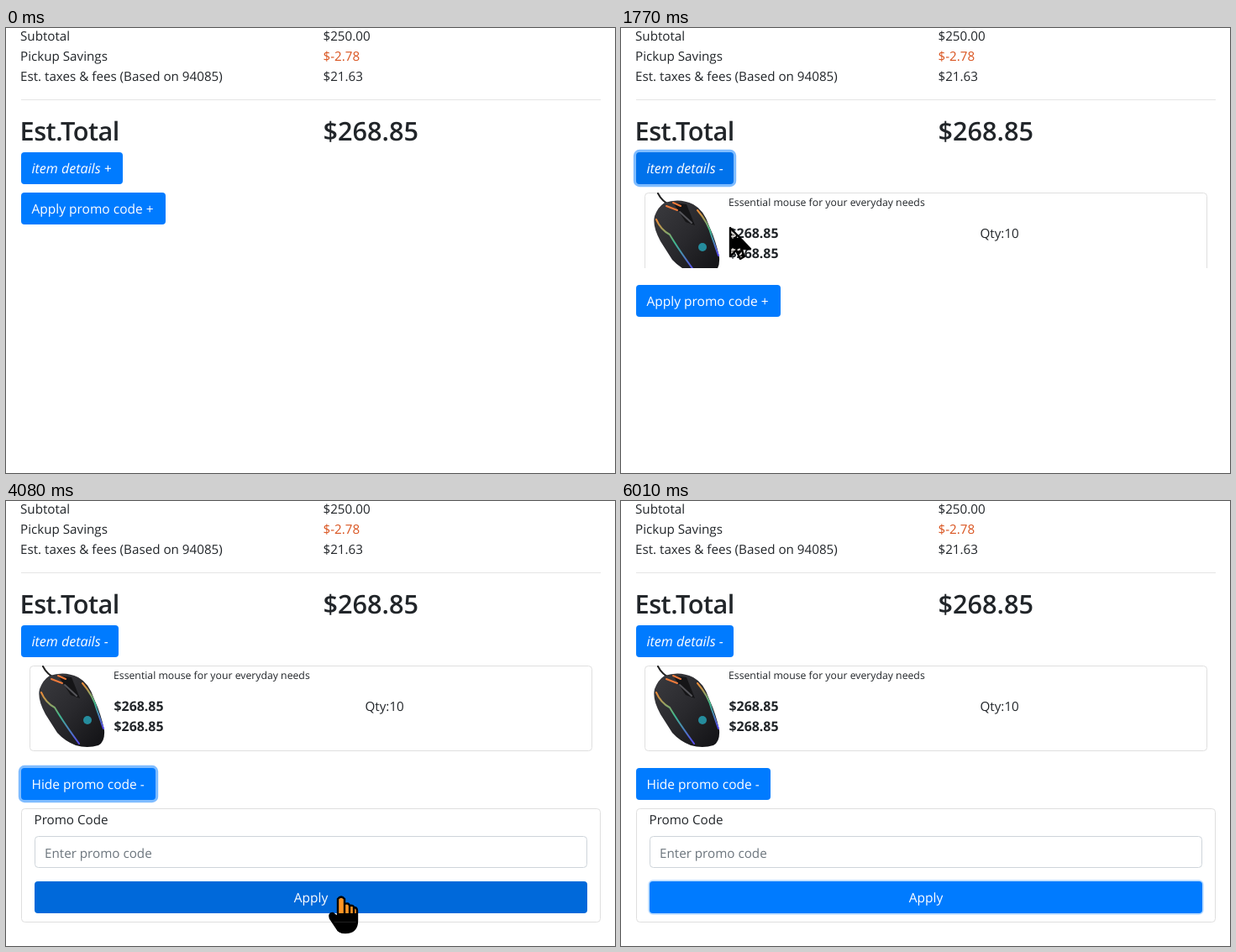
Animation, 725 px wide and 530 px high, one loop 6060 ms. Source, as an HTML page:

```html
<!DOCTYPE html>
<html lang="en">
<head>
<meta charset="utf-8">
<title>Order summary</title>
<style>
  html, body { margin: 0; width: 100%; height: 100%; overflow: hidden; background: #fff; }
  svg { display: block; font: 15.2px "Open Sans", "Noto Sans", sans-serif; fill: #212529; text-rendering: geometricPrecision; }
  .total { font-size: 30.7px; font-weight: 600; }
  .label { letter-spacing: -.5px; }
  .small { font-size: 12.25px; }
  .price { font-size: 15.9px; font-weight: 700; }
  .button text { font-size: 15.5px; fill: #fff; }
  .button .italic { font-size: 16.1px; font-style: italic; }
  .ring { fill: none; stroke: #007bff; }
  .card { fill: #fff; stroke: #dfdfdf; }
  .line { fill: none; stroke-width: 2; stroke-linecap: round; }
  #invert { fill: #fff; mix-blend-mode: difference; }
  #outline { fill: none; stroke: #000; stroke-width: 2.4; stroke-linejoin: round; }
</style>
</head>
<body>
<svg width="725" height="530" viewBox="0 0 725 530">
  <defs>
    <clipPath id="detailsClip"><rect x="0" y="196" width="725"/></clipPath>
    <clipPath id="promoClip"><rect x="0" y="366" width="725"/></clipPath>
    <linearGradient id="shell" x2="1" y2="1">
      <stop stop-color="#3b3b3f"/><stop offset=".5" stop-color="#29292d"/><stop offset="1" stop-color="#111114"/>
    </linearGradient>
    <linearGradient id="glow" x2="0" y2="1">
      <stop stop-color="#f08a35"/><stop offset=".45" stop-color="#3fb98c"/><stop offset="1" stop-color="#5948ef"/>
    </linearGradient>
  </defs>
  <rect width="725" height="530" fill="#fff"/>

  <text x="17" y="15">Subtotal</text><text x="377.5" y="15">$250.00</text>
  <text x="17" y="39">Pickup Savings</text><text x="377.5" y="39" fill="#d9531e">$-2.78</text>
  <text x="17" y="63">Est. taxes &amp; fees (Based on 94085)</text><text x="377.5" y="63">$21.63</text>
  <path d="M18 85.5H708" stroke="#e5e5e5"/>
  <text class="total label" x="16.5" y="134">Est.Total</text><text class="total" x="377.5" y="134">$268.85</text>

  <g clip-path="url(#detailsClip)">
    <rect class="card" x="28.5" y="196.5" width="669" height="101" rx="4"/>
    <g id="mouse">
      <path class="line" d="M44 197Q49 207 59 211" stroke="#222"/>
      <path d="M52 208Q70 202 86 210Q99 217 105 236Q113 253 117 273Q118 287 110 291Q97 295 83 291Q70 286 61 276L47 254Q37 236 40 224Q44 213 52 208Z" fill="url(#shell)"/>
      <path d="M62 208L78 210L88 235L77 231Z" fill="#151517"/>
      <path class="line" d="M70 219L84 232" stroke="#55555a" stroke-width="3"/>
      <path class="line" d="M54 212L67 217M62 208L71 212" stroke="#ed7a3b"/>
      <path class="line" d="M42 228Q47 240 58 246Q68 263 87 289" stroke="url(#glow)"/>
      <path class="line" d="M91 217Q104 232 108 248L116 271" stroke="url(#glow)" stroke-width="1.5"/>
      <circle cx="97" cy="261" r="5" fill="#258c9d"/>
    </g>
    <text class="small" x="128" y="212">Essential mouse for your everyday needs</text>
    <text class="price" x="128.5" y="250">$268.85</text><text class="price" x="128.5" y="274">$268.85</text>
    <text x="427.5" y="250">Qty:10</text>
  </g>

  <g class="button" id="details">
    <rect class="ring" x="18" y="148" height="38" rx="4"/><rect class="face" x="18" y="148" height="38" rx="4"/>
    <text class="italic" x="30.5" y="173"></text>
  </g>
  <g class="button" id="promo">
    <rect class="ring" x="18" height="38" rx="4"/><rect class="face" x="18" height="38" rx="4"/>
    <text x="30.5"></text>
  </g>

  <g clip-path="url(#promoClip)">
    <rect class="card" x="18.5" y="366.5" width="689" height="135" rx="4"/>
    <text x="33.5" y="385">Promo Code</text>
    <rect x="34.5" y="399.5" width="657" height="37" rx="4" fill="#fff" stroke="#ced4da"/>
    <text x="46" y="425" fill="#6c757d">Enter promo code</text>
    <g class="button" id="apply">
      <rect class="ring" x="34" y="453" height="38" rx="4"/><rect class="face" x="34" y="453" height="38" rx="4"/>
      <text x="363" y="478" text-anchor="middle">Apply</text>
    </g>
  </g>

  <path id="invert"/><path id="outline"/>
  <circle id="click" r="12" fill="#ff0" opacity=".5"/>
</svg>
<script>
const LOOP = 6060, DETAILS_OPEN = 1565, PROMO_OPEN = 2780;

const shapes = {
  arrow: "M1 2V36L8 29L13 39L18 36L14 27H25Z",
  hand: "M-4 3Q0 -2 4 3V9Q9 7 10 11Q15 10 15 13Q19 13 19 17V29Q19 36 15 40Q12 43 5 43Q-3 43 -5 38L-13 26Q-15 20 -10 20L-4 25ZM4 9V20M10 11V21M15 13V22",
  beam: "M-4 -15H4M0 -15V15M-4 15H4"
};

// Pointer path: time, x, y
const path = [
  [190, 651, 512], [400, 275, 262], [560, 168, 222], [760, 152, 208], [850, 146, 200],
  [890, 140, 188], [1000, 118, 174], [1350, 112, 176], [1640, 112, 176], [1735, 122, 188],
  [1770, 129, 235], [1930, 105, 326], [2030, 100, 334], [2160, 108, 327], [2330, 92, 337],
  [2530, 102, 333], [2900, 102, 337], [3050, 110, 440], [3150, 117, 507], [3350, 117, 507],
  [3450, 170, 480], [3720, 340, 438], [3800, 378, 423], [3900, 380, 423], [4050, 398, 470],
  [4300, 405, 482], [5000, 405, 482], [5120, 425, 492], [5220, 470, 531]
];
const hovers = {
  details: [[960, 1735]],
  promo: [[500, 880], [1930, 2930]],
  apply: [[3400, 3720], [3960, 5120]]
};
const focus = { details: [1420, 2690], promo: [2700, 4575], apply: [4615, LOOP + 200] };
const clicks = [[1340, 1480], [2620, 2760], [4580, 4720]];

const $ = selector => document.querySelector(selector);
const within = (t, [from, to]) => t >= from && t < to;
const ramp = (t, start, length = 150) =>
  1 - (1 - Math.min(1, Math.max(0, (t - start) / length))) ** 2.4;
const pulse = (t, [from, to]) => ramp(t, from) - ramp(t, to);
const unfold = (t, start, height) => Math.round(height * ramp(t, start, 350));

function set(selector, attributes) {
  for (const name in attributes) $(selector).setAttribute(name, attributes[name]);
}

function drawButton(id, t, width, ring = pulse(t, focus[id])) {
  const hover = hovers[id].reduce((sum, span) => sum + pulse(t, span), 0);
  set(`#${id} .face`, { width, fill: `rgb(0,${123 - 18 * hover},${255 - 38 * hover})` });
  set(`#${id} .ring`, { width, "stroke-width": 6.4 * ring, "stroke-opacity": ring / 2 });
}

function pointerAt(t) {
  const i = path.findIndex(key => key[0] > t);
  if (i < 1) return null;
  const [t0, x0, y0] = path[i - 1], [t1, x1, y1] = path[i], k = (t - t0) / (t1 - t0);
  return [x0 + (x1 - x0) * k, y0 + (y1 - y0) * k].map(Math.round);
}

function drawPointer(t) {
  const point = pointerAt(t), visibility = point ? "visible" : "hidden";
  const [x, y] = point || [0, 0];
  const overButton = Object.values(hovers).flat().some(span => within(t, span));
  const d = overButton ? shapes.hand : within(t, [3720, 3960]) ? shapes.beam : shapes.arrow;
  const transform = `translate(${x} ${y})`;
  set("#invert", { d, transform, visibility });
  set("#outline", { d, transform, visibility });
  set("#click", { transform, visibility: clicks.some(span => within(t, span)) ? "visible" : "hidden" });
}

function draw(t) {
  const detailsOpen = t >= DETAILS_OPEN, promoOpen = t >= PROMO_OPEN;
  const height = unfold(t, DETAILS_OPEN, 102);
  const y = detailsOpen ? 216 + height : 196;

  set("#detailsClip rect", { height });
  set("#promoClip rect", { height: unfold(t, PROMO_OPEN, 136) });

  drawButton("details", t, detailsOpen ? 116 : 121);
  drawButton("promo", t, promoOpen ? 160 : 172);
  drawButton("apply", t, 658, t < 6010 ? pulse(t, focus.apply) : .55);
  $("#details text").textContent = "item details " + (detailsOpen ? "-" : "+");
  $("#promo text").textContent = promoOpen ? "Hide promo code -" : "Apply promo code +";
  set("#promo .ring", { y });
  set("#promo .face", { y });
  set("#promo text", { y: y + 25 });
  drawPointer(t);
}

const start = performance.now();
function tick() {
  draw((performance.now() - start) % LOOP);
  requestAnimationFrame(tick);
}
tick();
</script>
</body>
</html>
```
